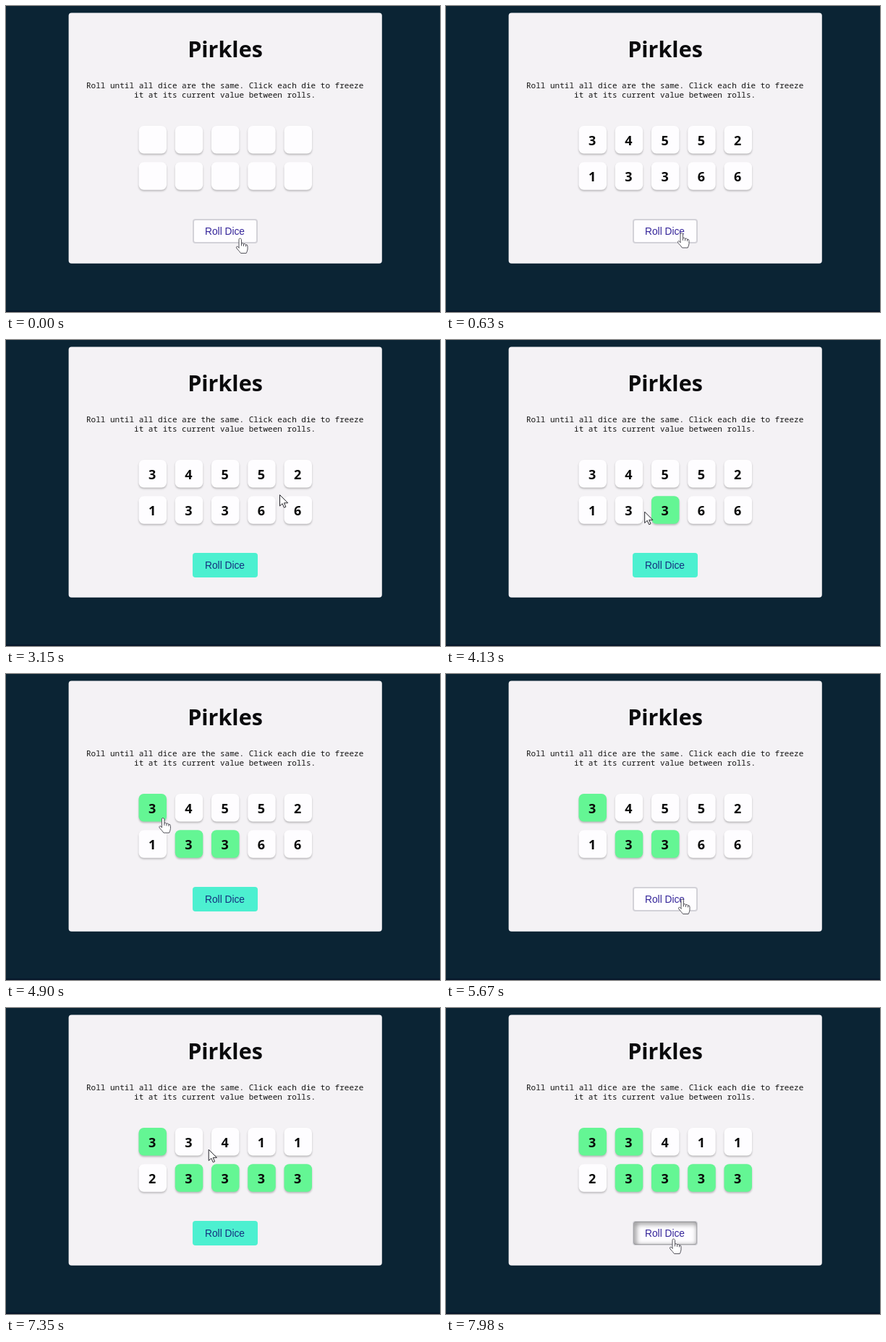
Animation of 600 by 424 pixels, one loop 8 s. Source, as an HTML page with a canvas:

```html
<!DOCTYPE html>
<html lang="en">
<head>
<meta charset="utf-8">
<title>Dice game</title>
<style>
  html, body { margin: 0; width: 100%; height: 100%; overflow: hidden; background: #0b2434; }
  canvas { display: block; width: 100vw; height: 100vh; }
</style>
</head>
<body>
<canvas id="stage" width="600" height="424"></canvas>
<script>
const ctx = document.getElementById('stage').getContext('2d');
const LOOP = 8000, STEP = 70;
const SANS = '"Noto Sans", "Open Sans", sans-serif';
const MONO = '"Noto Sans Mono", "DejaVu Sans Mono", monospace';
const BUTTON = { x: 258, y: 295, w: 90, h: 34 };
const DIE = 38.5, PITCH = 50.25;

const dieRect = i => ({
  x: 183.5 + (i % 5) * PITCH,
  y: 166 + Math.floor(i / 5) * PITCH,
  w: DIE, h: DIE
});

// The pointer rests at each stop from `arrive` to `leave`; a die there is clicked just after arrival
const stop = (arrive, leave, x, y, die) => ({ arrive, leave, x, y, die });
const dieStop = (arrive, leave, die) => {
  const r = dieRect(die);
  return stop(arrive, leave, r.x + DIE / 2, r.y + DIE / 2 + 3, die);
};

const stops = [
  stop(0, 140, 323, 322),
  stop(1120, 2450, 327, 307),
  stop(3150, 3150, 378, 215),
  dieStop(3640, 3920, 7),
  dieStop(4300, 4340, 6),
  dieStop(4690, 4830, 0),
  stop(5180, 5600, 334, 297),
  stop(5670, 6020, 326, 312),
  dieStop(6370, 6510, 8),
  stop(6720, 7140, 424, 241, 9),
  dieStop(7420, 7560, 1),
  stop(7840, LOOP, 314, 320)
];

const clickTime = die => (stops.find(s => s.die === die) || { arrive: Infinity }).arrive + STEP;
const presses = [[210, 350], [5880, 5950], [7910, LOOP]];
const rolls = [[0, '          '], [350, '3455213366'], [5950, '3341123333']];
const SELECTED = 8;

function pointerAt(t) {
  const i = stops.findIndex(s => t <= s.leave);
  const to = stops[i], from = stops[i - 1];
  if (t >= to.arrive) return to;
  const u = (t - from.leave) / (to.arrive - from.leave);
  const e = u * u * (3 - 2 * u);
  return { x: from.x + (to.x - from.x) * e, y: from.y + (to.y - from.y) * e };
}

function inside(p, r, pad = 0) {
  return p.x >= r.x - pad && p.x <= r.x + r.w + pad &&
         p.y >= r.y - pad && p.y <= r.y + r.h + pad;
}

function box({ x, y, w, h }, radius, fill) {
  ctx.beginPath();
  ctx.roundRect(x, y, w, h, radius);
  ctx.fillStyle = fill;
  ctx.fill();
}

function text(s, x, y, font, fill) {
  ctx.font = font;
  ctx.fillStyle = fill;
  ctx.fillText(s, x, y);
}

function shadow(color, blur, dx, dy) {
  ctx.shadowColor = color;
  ctx.shadowBlur = blur;
  ctx.shadowOffsetX = dx;
  ctx.shadowOffsetY = dy;
}

function drawCard() {
  ctx.fillStyle = '#0b2434';
  ctx.fillRect(0, 0, 600, 424);
  ctx.fillStyle = '#07172a';
  ctx.fillRect(0, 422, 600, 2);
  box({ x: 86.6, y: 9.4, w: 433.2, h: 347.4 }, 4, '#f4f2f5');
  text('Pirkles', 303, 71, `bold 30.5px ${SANS}`, '#0b0b0d');
  const font = `11.03px ${MONO}`;
  text('Roll until all dice are the same. Click each die to freeze', 302.6, 114, font, '#151515');
  text('it at its current value between rolls.', 302.6, 127, font, '#151515');
}

function drawDie(i, value, t) {
  const r = dieRect(i), mid = r.x + DIE / 2;
  const clicked = clickTime(i);
  ctx.save();
  shadow('rgba(0,0,0,.24)', 2.5, 0, 1.8);
  box(r, 7, t >= clicked ? '#64f694' : '#fefdff');
  ctx.restore();
  const picked = i === SELECTED && t >= clicked && t < clickTime(9) + 280;
  if (picked) {
    ctx.fillStyle = '#2f8ddb';
    ctx.fillRect(mid - 5.5, r.y + 6.5, 11, 25.5);
  }
  text(value, mid - 0.5, r.y + 27, `bold 18px ${SANS}`, picked ? '#fff' : '#0a0a0a');
}

function drawButton(hover, pressed) {
  const { x, y, w, h } = BUTTON;
  box(BUTTON, 4, hover ? '#d3d2d8' : '#4cf0d0');
  if (hover) box({ x: x + 2, y: y + 2, w: w - 4, h: h - 4 }, 2, '#fefdff');
  if (pressed) {
    ctx.save();
    ctx.beginPath();
    ctx.roundRect(x + 1.5, y + 1, w - 3, h - 2, 3);
    ctx.clip();
    shadow('rgba(0,0,0,.65)', 7, 2, 2);
    ctx.strokeStyle = '#999';
    ctx.lineWidth = 4;
    ctx.strokeRect(x, y - 0.5, w, h + 1);
    ctx.restore();
  }
  text('Roll Dice', 302.5, 316.6, '13.75px "Liberation Sans", Arial, sans-serif',
    hover ? '#35259a' : '#14307f');
}

const ARROW = new Path2D('M0 0V15L3.6 11.7L6 17.2L8.4 16.2L6 10.8H10.8Z');
const HAND = new Path2D('M-1.5 13V1.5Q-1.5 0 0 0T2 1.5V7Q4 6 5 7.7Q7 6.9 8 8.7Q10.5 8.2 10.5 11V15Q10 18 8.7 20.5H1Q-1 17.5-4.5 14Q-5.8 11.8-4 11Q-3 11-1.5 13Z');
const KNUCKLES = new Path2D('M2 7V10M5 8V10.5M8 9V11');

function drawPointer(p, hand) {
  ctx.save();
  ctx.translate(p.x + 0.5, p.y);
  ctx.lineJoin = ctx.lineCap = 'round';
  const shape = hand ? HAND : ARROW;
  ctx.fillStyle = '#fff';
  ctx.strokeStyle = hand ? '#55545c' : '#25252b';
  ctx.lineWidth = 1;
  ctx.fill(shape);
  ctx.stroke(shape);
  if (hand) ctx.stroke(KNUCKLES);
  ctx.restore();
}

function draw(t) {
  ctx.textAlign = 'center';
  const p = pointerAt(t);
  const hover = inside(p, BUTTON);
  const pressed = presses.some(([from, to]) => t >= from && t < to);
  const values = [...rolls.filter(([from]) => t >= from).pop()[1]];
  drawCard();
  values.forEach((value, i) => drawDie(i, value, t));
  drawButton(hover, pressed);
  const onDie = values.some((_, i) => inside(p, dieRect(i), 1.5));
  drawPointer(p, hover || onDie);
}

const start = performance.now();
function tick() {
  const t = (performance.now() - start) % LOOP;
  draw(Math.floor(t / STEP) * STEP);
  requestAnimationFrame(tick);
}
tick();
</script>
</body>
</html>
```
